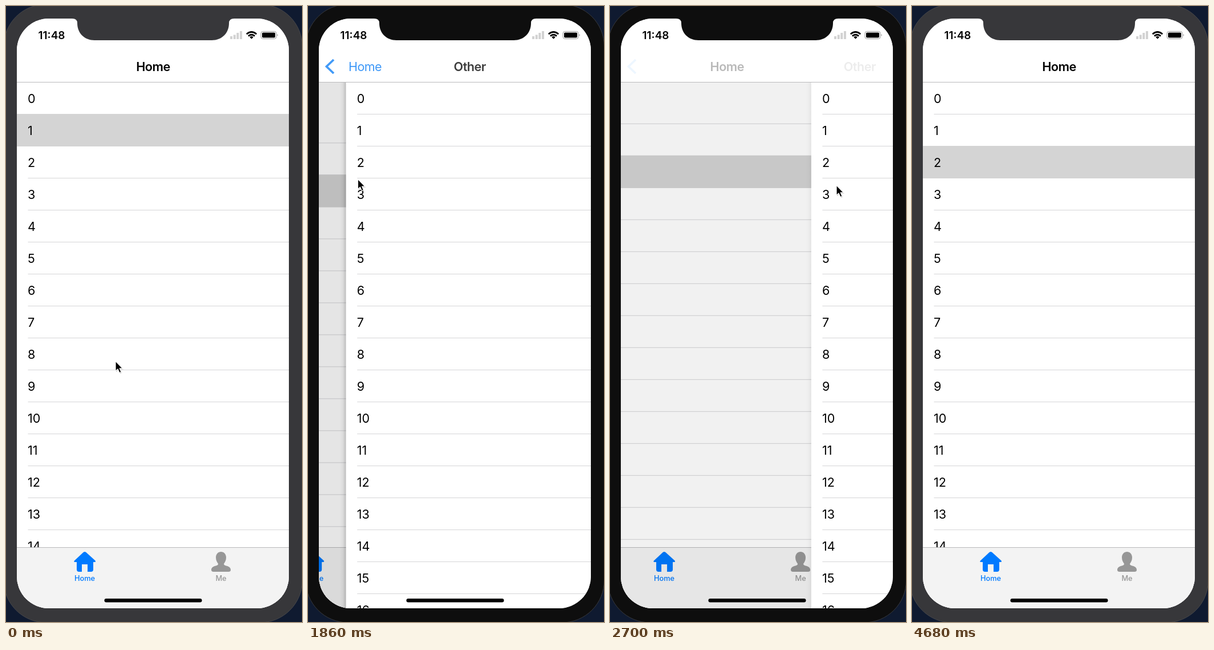
Recreate the animation shown at these times as an HTML page. Size 519 by 1079 pixels, loop 4.74 s.

```html
<!DOCTYPE html>
<html lang="en">
<head>
<meta charset="utf-8">
<title>Navigation push and swipe back</title>
<style>
  html, body { margin: 0; width: 100%; height: 100%; overflow: hidden; background: #0f1a30; }
  svg { display: block; width: 100%; height: 100%; --bezel: #37373a; --rim: #47474a; --blue: #067af5; }
  svg.active { --bezel: #0e0e0e; --rim: #37383b; }
  text { font-family: Inter, Roboto, sans-serif; font-size: 21.6px; white-space: pre; }
  .mid { text-anchor: middle; }
  .title { font-weight: 600; letter-spacing: -.5px; }
  .back { fill: var(--blue); letter-spacing: -.6px; }
  .clock { font-size: 19px; font-weight: 600; }
  .tab { font-size: 12.8px; font-weight: 500; }
  .bezel { fill: var(--bezel); }
  .line { fill: #d5d5d7; }
  .bar { fill: #b9b9bb; }
</style>
</head>
<body>
<svg id="stage" viewBox="0 0 519 1079">
  <defs>
    <clipPath id="screen"><rect x="19" y="22" width="477" height="1033" rx="56"/></clipPath>
    <linearGradient id="fade">
      <stop offset="0" stop-opacity="0"/>
      <stop offset=".5" stop-opacity=".04"/>
      <stop offset="1" stop-opacity=".18"/>
    </linearGradient>
  </defs>

  <rect width="519" height="1079" fill="#0f1a30"/>
  <rect class="bezel" x="-4" y="-3" width="523.5" height="1083" rx="74" stroke="var(--rim)"/>

  <g clip-path="url(#screen)">
    <rect x="19" y="22" width="477" height="1033" fill="#fff"/>

    <g id="home">
      <rect y="134" width="477" height="921" fill="#fff"/>
      <g id="homeList"><rect id="mark" y="189" width="477" height="57" fill="#d4d4d4"/></g>
      <rect y="949" width="477" height="106" fill="#f3f3f3"/>
      <rect class="bar" y="948" width="477" height="1"/>
      <g fill="#007aff">
        <path d="M116.5 957Q119 955 121.500 957L137.500 971.500Q139 973.500 136.500 974H134V987Q134 991 130 991H124V978H114V991H109Q105 991 105 987V974H102Q99 973.500 101 971.500Z"/>
        <text class="tab mid" x="119" y="1007">Home</text>
      </g>
      <g fill="#979797">
        <path d="M358 956C363 956 367 960 367 966C367 971 365 974 363 977C363 980 366 980 369 981C374 983 375 985 375 988Q375 991 371 991H345Q341 991 341 988C341 985 342 983 347 981C350 980 353 980 353 977C351 974 349 971 349 966C349 960 353 956 358 956Z"/>
        <text class="tab mid" x="358" y="1007">Me</text>
      </g>
      <rect id="dim" y="134" width="477" height="921"/>
    </g>

    <g id="other">
      <rect id="shade" x="-11" y="134" width="11" height="921" fill="url(#fade)"/>
      <rect y="134" width="477" height="921" fill="#fff"/>
      <g id="otherList"></g>
    </g>

    <rect x="19" y="22" width="477" height="111" fill="#fff"/>
    <rect class="bar" x="19" y="133" width="477" height="1"/>
    <path id="chevron" d="M45 94L32.500 106L45 118" fill="none" stroke="var(--blue)" stroke-width="3.800"/>
    <text id="back" class="back mid" y="113.500">Home</text>
    <text id="homeTitle" class="title mid" y="113.500">Home</text>
    <text id="otherTitle" class="title mid" y="113.500">Other</text>

    <text class="clock mid" x="80" y="58">11:48</text>
    <path d="M393 58v-5h4v5zM398.700 58v-7.500h4v7.500zM404.300 58v-11h4v11zM410 58v-14h4v14z" fill="#d2d2d2"/>
    <g fill="none" stroke="#000" stroke-width="2.800">
      <path d="M421.800 49.200Q430.500 41.800 439.200 49.200M424.900 52.600Q430.500 47.900 436.100 52.600"/>
      <path d="M427.300 54.400Q430.500 51.800 433.700 54.400L430.500 57.800Z" fill="#000" stroke="none"/>
    </g>
    <rect x="447" y="44.500" width="27" height="13" rx="3.500" fill="none" stroke="#999"/>
    <rect x="449" y="46.500" width="23" height="9" rx="1.800"/>
    <path d="M475.500 49Q478 51 475.500 53Z" fill="#999"/>

    <path class="bezel" d="M116 21V22Q125 22 125 30C125 48 138 60 155 60H361C378 60 391 48 391 30Q391 22 400 22V21Z"/>
    <rect x="172.500" y="1038" width="171" height="6.500" rx="3.250"/>
  </g>

  <g id="cursor">
    <path d="M1 2V19L5 15.500L8 22L11 20.500L8.500 14.500H14Z" fill="#0003"/>
    <path d="M0 0V17.500L4 14L7 20.500L10 19.200L7.300 12.900H12.500Z" stroke="#fff" stroke-width="1.200"/>
  </g>
</svg>

<script>
const LOOP = 4740, STEP = 60, ROW = 56, WIDTH = 477, LEFT = 19;
const FOCUS = 660, SELECT = 720, PUSH = 790, DRAG = 1720, RELEASE = 2790, BLUR = 4500;
const el = {};
document.querySelectorAll('[id]').forEach(node => el[node.id] = node);

const clamp = v => Math.max(0, Math.min(1, v));

// Critically damped spring: what is left of the way after ms
const rest = ms => {
  if (ms <= 0) return 1;
  if (ms > 390) return 0;
  const x = ms / 50;
  return (1 + x) * Math.exp(-x);
};

// Linear interpolation through [key, ...values] points
function track(points, key) {
  const next = points.findIndex(p => p[0] > key);
  if (next < 0) return points[points.length - 1].slice(1);
  if (next === 0) return points[0].slice(1);
  const a = points[next - 1], b = points[next];
  const k = (key - a[0]) / (b[0] - a[0]);
  return a.slice(1).map((v, i) => v + (b[i + 1] - v) * k);
}

const pointer = [
  [0, 192, 622], [120, 188, 575], [540, 145, 257], [840, 144, 256],
  [1140, 107, 284], [1440, 18, 298], [1560, 20, 300], [1740, 42, 303],
  [2160, 201, 304], [2700, 397, 314], [3060, 530, 325], [3360, 530, 330],
  [3480, 505, 380], [3840, 408, 980], [4200, 200, 1085]
];
const otherFade = [[0, 1], [.31, .25], [.7, .07], [1, 0]];
const backFade = [[0, 1], [.31, .3], [.6, 0]];
const homeFade = [[.5, 0], [.7, .27], [1, 1]];

function fillList(list, count) {
  let rows = '';
  for (let i = 0; i < count; i++) {
    const y = 134 + i * ROW;
    rows += `<text x="19" y="${y + 35.5}">${i}</text>`;
    rows += `<rect class="line" x="19.500" y="${y + ROW - 1}" width="457.500" height="1"/>`;
  }
  list.insertAdjacentHTML('afterbegin', rows);
  const mark = list.querySelector('#mark');
  if (mark) list.append(mark, ...list.querySelectorAll('text'));
}

const move = (node, x, y = 0) => node.setAttribute('transform', `translate(${x} ${y})`);
const fade = (node, v) => node.setAttribute('opacity', clamp(v));

// How far the second page covers the first, 0 to 1
function coverage(t) {
  if (t < DRAG) return 1 - rest(t - PUSH);
  const dragged = .3407 * (Math.min(t, RELEASE) - DRAG) / WIDTH;
  return (1 - dragged) * rest(t - RELEASE);
}

function draw(t) {
  const popping = t >= DRAG;
  const p = coverage(t);
  const title = popping ? p : 1 - rest(t - PUSH - 10);
  const gone = 1 - p;

  el.stage.classList.toggle('active', t >= FOCUS && t < BLUR);
  move(el.mark, 0, t < SELECT ? ROW : 2 * ROW);
  el.mark.setAttribute('y', 133);

  move(el.home, LEFT - .3 * WIDTH * p);
  move(el.homeList, 0, popping ? ROW * p : 0);
  fade(el.dim, .11 * p ** .6);
  move(el.other, LEFT + WIDTH * gone);
  move(el.otherList, 0, popping ? 0 : ROW * gone);
  fade(el.shade, popping ? (p - .15) / .5 : p * 5);

  const homeX = 258 - 175.5 * title;
  move(el.homeTitle, homeX);
  move(el.back, homeX);
  move(el.otherTitle, 258 + 257 * (1 - title));
  if (popping) {
    fade(el.homeTitle, track(homeFade, gone)[0]);
    fade(el.back, track(backFade, gone)[0]);
    fade(el.otherTitle, track(otherFade, gone)[0]);
    fade(el.chevron, track(otherFade, gone)[0]);
  } else {
    fade(el.homeTitle, 1 - title * .68 - Math.max(0, title - .3) * .5);
    fade(el.back, (title - .3) / .7);
    fade(el.otherTitle, title * 1.1);
    fade(el.chevron, title * 1.25);
    if (title > .97) fade(el.homeTitle, 0);
  }

  move(el.cursor, ...track(pointer, t));
}

fillList(el.homeList, 15);
fillList(el.otherList, 17);

const start = performance.now();
function tick() {
  const t = (performance.now() - start) % LOOP;
  draw(Math.floor(t / STEP) * STEP);
  requestAnimationFrame(tick);
}
draw(0);
requestAnimationFrame(tick);
</script>
</body>
</html>
```
